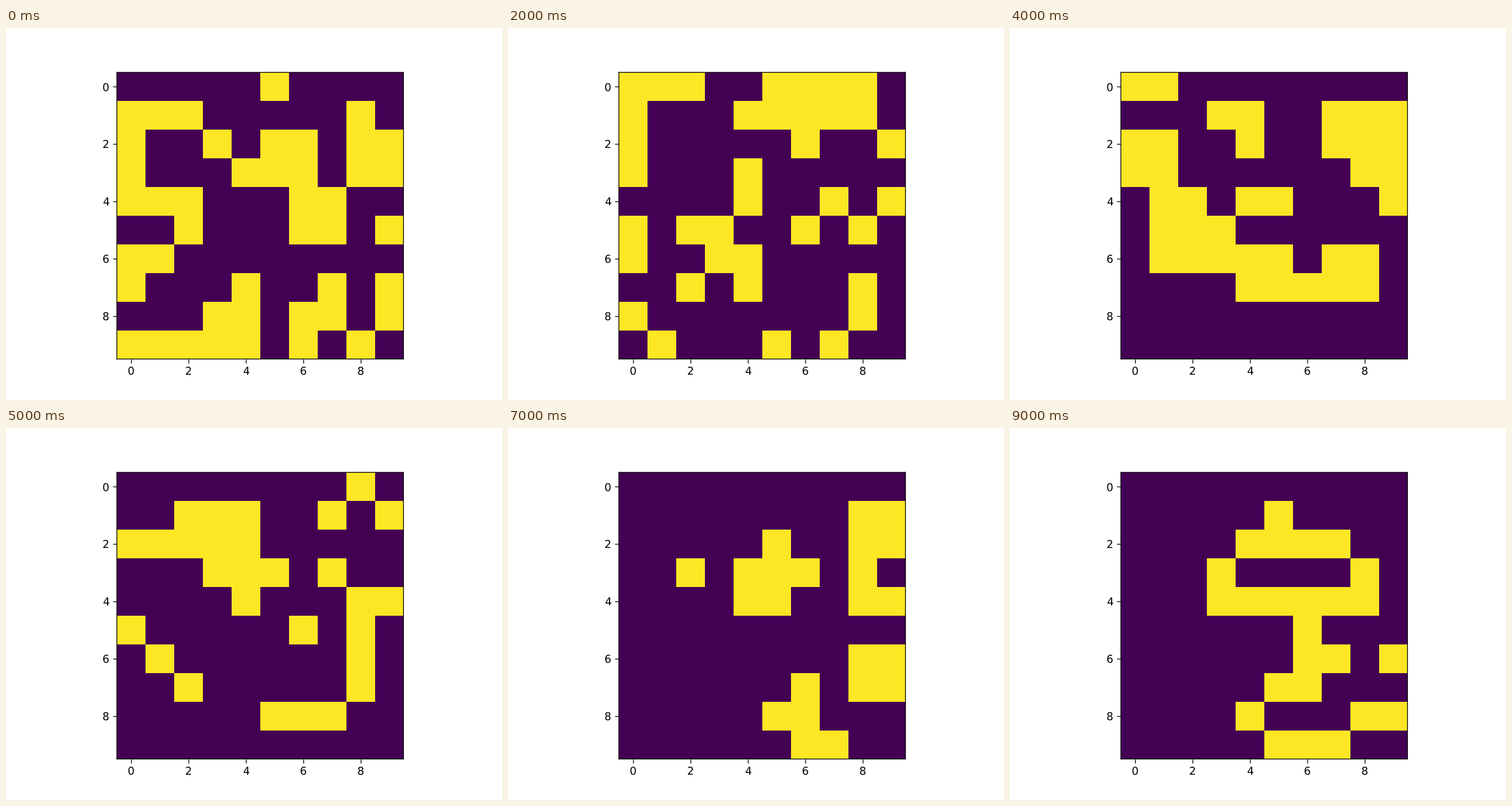
Animation, 864 px wide and 648 px high, one loop 10 s. Source, as a matplotlib script:

```python
import matplotlib.pyplot as plt
import numpy as np
from matplotlib.animation import FuncAnimation

WIDTH, HEIGHT, DPI = 864, 648, 135
SIZE, STEPS = 10, 10
LEFT, BOTTOM, SIDE = 193.1, 71.4, 499.3  # board in pixels
LINE = 0.72

# Corners (x, y) of the strokes that draw the starting generation
STROKES = [
    [(2, 1), (0, 1), (0, 4), (2, 4), (2, 5), (1, 6), (0, 6), (0, 7)],
    [(3, 2), (4, 3), (5, 3), (5, 2), (6, 2), (6, 5), (7, 5), (7, 4)],
    [(6, 9), (6, 8), (7, 7), (7, 8), (8, 9), (9, 8), (9, 7)],
    [(8, 1), (8, 3), (9, 3), (9, 2)],
    [(0, 9), (4, 9), (4, 7), (3, 8)],
    [(5, 0)],
    [(9, 5)],
]


def first_board():
    board = np.zeros((SIZE, SIZE), dtype=int)
    for stroke in STROKES:
        for (x0, y0), (x1, y1) in zip(stroke, stroke[1:] or stroke):
            count = max(abs(x1 - x0), abs(y1 - y0)) + 1
            board[np.linspace(y0, y1, count).round().astype(int),
                  np.linspace(x0, x1, count).round().astype(int)] = 1
    return board


def evolve(board):
    """One Game of Life step; cells beyond the edge are dead."""
    pad = np.pad(board, 1)
    block = sum(pad[y:y + SIZE, x:x + SIZE] for y in range(3) for x in range(3))
    near = block - board
    return ((near == 3) | ((board == 1) & (near == 2))).astype(int)


boards = [first_board()]
while len(boards) < STEPS:
    boards.append(evolve(boards[-1]))

plt.rcParams["text.hinting"] = "none"
fig = plt.figure(figsize=(WIDTH / DPI, HEIGHT / DPI), dpi=DPI)
ax = fig.add_axes([LEFT / WIDTH, BOTTOM / HEIGHT, SIDE / WIDTH, SIDE / HEIGHT])
image = ax.imshow(boards[0], cmap="viridis", vmin=0, vmax=1,
                  interpolation="nearest", aspect="auto")
ticks = range(0, SIZE, 2)
ax.set_xticks(ticks)
ax.set_yticks(ticks)
ax.tick_params(width=LINE)
for spine in ax.spines.values():
    spine.set_linewidth(LINE)
    spine.set_snap(False)


def update(step):
    image.set_data(boards[step])
    return (image,)


anim = FuncAnimation(fig, update, frames=STEPS, interval=1000,
                     repeat=True, repeat_delay=0)
plt.show()
```
